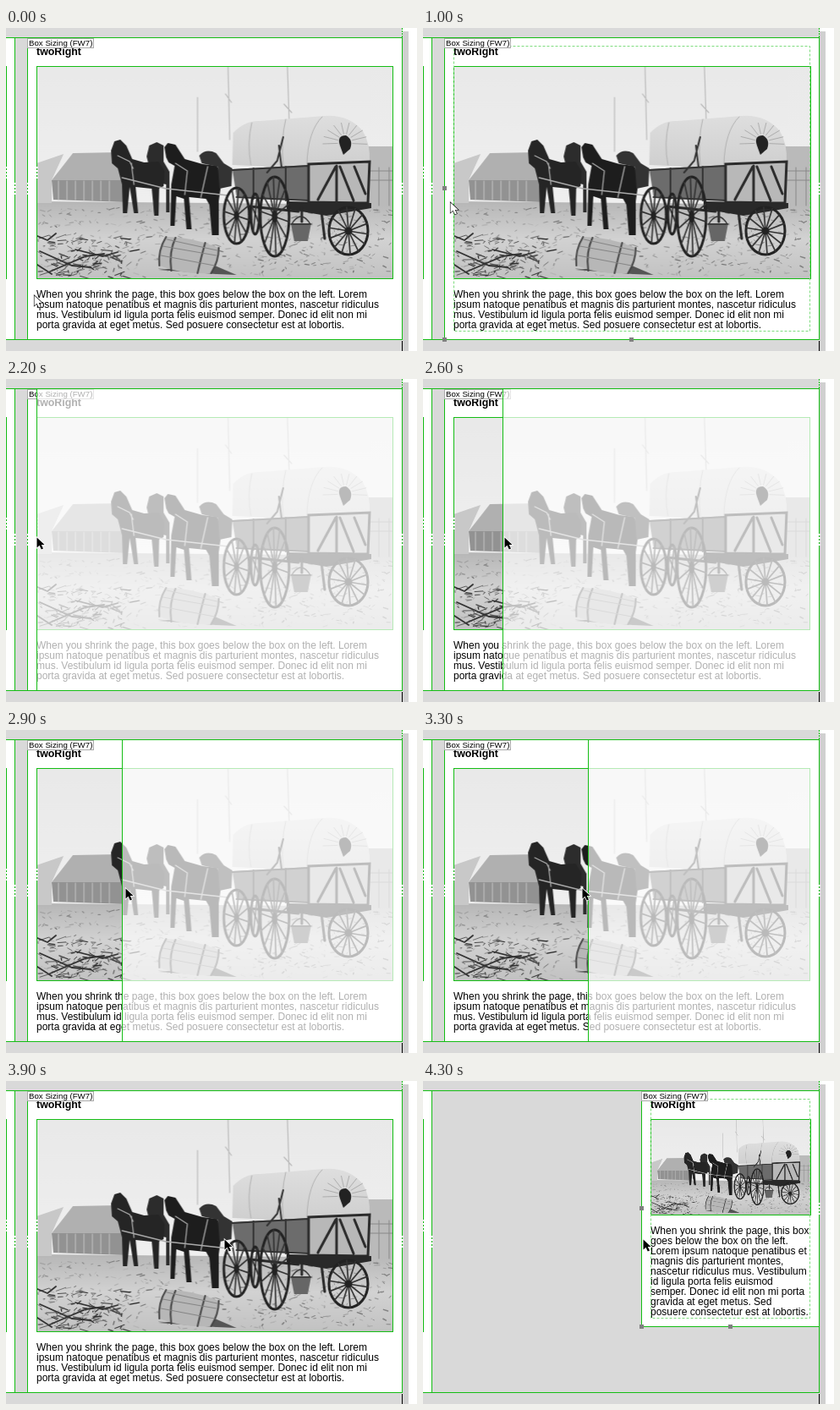
Animation of 486x382 px, one loop 7.3 s. Source, as an HTML page with a canvas:

```html
<!DOCTYPE html>
<html lang="en">
<head>
<meta charset="utf-8">
<title>Box sizing</title>
<style>
  html, body { margin: 0; width: 100%; height: 100%; overflow: hidden; background: #fff; }
  canvas { display: block; }
</style>
</head>
<body>
<canvas id="stage" width="486" height="382"></canvas>
<script>
const ctx = document.getElementById('stage').getContext('2d');
const LOOP = 7300, STEP = 100;
const GREEN = '#14bd14', GREY = '#d9d9d9';
const SANS = '"Liberation Sans", Arial, sans-serif';

// Keyframes: [time, value...]
const cursorKeys = [[0, 33, 316], [800, 32, 206], [1000, 32, 206], [1600, 26, 187], [2000, 26, 187],
  [2200, 36, 187], [2900, 141, 187], [3600, 223, 187], [3900, 258, 187], [4300, 260, 187]];
const edgeKeys = [[2000, 25], [2200, 36], [2900, 137], [3600, 238], [3800, 258]];

const wide = {
  x: 25, bottom: 368, photoBottom: 296, baseline: 319,
  lines: ['When you shrink the page, this box goes below the box on the left. Lorem',
    'ipsum natoque penatibus et magnis dis parturient montes, nascetur ridiculus',
    'mus. Vestibulum id ligula porta felis euismod semper. Donec id elit non mi',
    'porta gravida at eget metus. Sed posuere consectetur est at lobortis.']
};
const narrow = {
  x: 258, bottom: 290, photoBottom: 158, baseline: 181,
  lines: ['When you shrink the page, this box', 'goes below the box on the left.',
    'Lorem ipsum natoque penatibus et', 'magnis dis parturient montes,',
    'nascetur ridiculus mus. Vestibulum', 'id ligula porta felis euismod',
    'semper. Donec id elit non mi porta', 'gravida at eget metus. Sed',
    'posuere consectetur est at lobortis.']
};

function sample(keys, t) {
  let i = 1;
  while (i < keys.length - 1 && t > keys[i][0]) i++;
  const a = keys[i - 1], b = keys[i];
  const k = Math.max(0, Math.min(1, (t - a[0]) / (b[0] - a[0])));
  return a.slice(1).map((v, n) => Math.round(v + (b[n + 1] - v) * k));
}

function rect(color, x, y, w, h) {
  ctx.fillStyle = color;
  ctx.fillRect(x, y, w, h);
}

function frame(color, x, y, right, bottom, dash = []) {
  ctx.strokeStyle = color;
  ctx.lineWidth = 1;
  ctx.setLineDash(dash);
  ctx.strokeRect(x + .5, y + .5, right - x, bottom - y);
  ctx.setLineDash([]);
}

function text(str, x, y, font) {
  ctx.fillStyle = '#000';
  ctx.font = `${font} ${SANS}`;
  ctx.fillText(str, x, y);
}

// Dotted gap in the middle of an edge
function flexMark(x, top, bottom) {
  const mid = Math.floor((top + bottom) / 2);
  for (let y = mid - 6; y < mid + 8; y += 4) rect('#fff', x, y, 2, 2);
}

function makePhoto() {
  const canvas = document.createElement('canvas');
  canvas.width = 421;
  canvas.height = 251;
  const g = canvas.getContext('2d');
  g.translate(-36, -45);
  g.lineCap = 'round';

  let seed = 7;
  const random = () => (seed = seed * 16807 % 2147483647) / 2147483647;
  const fill = (color, d) => { g.fillStyle = color; g.fill(new Path2D(d)); };
  const line = (color, width, d) => {
    g.strokeStyle = color;
    g.lineWidth = width;
    g.stroke(new Path2D(d));
  };
  const gradient = (top, bottom, ...stops) => {
    const grad = g.createLinearGradient(0, top, 0, bottom);
    stops.forEach((c, i) => grad.addColorStop(i / (stops.length - 1), c));
    return grad;
  };
  const scatter = (count, x, y, w, h, size, shade) => {
    for (let i = 0; i < count; i++) {
      const px = x + random() * w, py = y + random() * h, v = shade + random() * 70;
      line(`rgb(${v},${v},${v})`, .5 + random(), `M${px} ${py}l${(random() - .3) * size} ${(random() - .5) * size * .5}`);
    }
  };
  const wheel = (x, y, rx, ry, spokes) => {
    g.strokeStyle = '#222';
    g.lineWidth = 3;
    g.beginPath();
    g.ellipse(x, y, rx, ry, 0, 0, 7);
    g.stroke();
    for (let i = 0; i < spokes; i++) {
      const a = (i + .3) / spokes * Math.PI * 2;
      line('#333', 1.7, `M${x} ${y}L${x + rx * Math.cos(a)} ${y + ry * Math.sin(a)}`);
    }
    g.fillStyle = '#222';
    g.beginPath();
    g.ellipse(x, y, rx * .2, ry * .15, 0, 0, 7);
    g.fill();
  };

  // Sky, masts and ground
  fill(gradient(45, 200, '#e9e9e9', '#efefef'), 'M36 45H457V210H36Z');
  line('#bbb', 1.2, 'M226 82V146M262 46L264 132M332 46L334 108M328 90l9 10M259 78l7 10');
  fill(gradient(203, 296, '#b5b5b5', '#d2d2d2', '#c2c2c2'), 'M36 205L457 209V296H36Z');

  // Tents and sheds
  fill('#c8c8c8', 'M36 160L68 149L54 180V207H36Z');
  fill('#b0b0b0', 'M54 180L79 148L134 147L136 180Z');
  fill('#929292', 'M54 180H142V206L56 203Z');
  line('#c4c4c4', 1, 'M62 181V203M72 181V203M82 181V203M92 181V204M102 181V204M112 181V204M122 181V205');
  fill('#bababa', 'M426 140H457V211H426Z');
  line('#888', 1, 'M430 169H457M430 180H457M440 165V210M452 165V210');
  scatter(520, 38, 212, 416, 82, 9, 115);
  scatter(130, 38, 248, 110, 46, 18, 35);
  line('#333', 1.8, 'M37 246l12 5l10-8M40 264l38 17l22 2M52 288l42-18l22-3M37 280l17 11M82 262l32 8l18-5');

  // Horse team
  fill('#2c2c2c', 'M166 152L169 139L178 135L186 139V158L193 170V218H189V185L181 183L180 222H175L173 180Z');
  fill('#252525', 'M125 160L124 145L128 134L135 132L142 139L149 155L163 159L180 158L187 169L186 187L180 190V222H175L172 190L153 188L156 219H151L146 188L143 219H138L137 185L132 166Z');
  fill('#1d1d1d', 'M189 153L187 141L191 136L200 138L211 155L232 161L249 163L255 177L251 205V245H243L240 209L236 202L216 200L219 238H213L210 202L201 199L199 234H194L195 185L199 163L192 159Z');
  fill('#333', 'M228 151Q236 142 248 148L257 160L267 166L266 187L252 190L250 164L231 160Z');
  line('#aaa', 1.3, 'M132 151l14 7l4 8M148 160l3 25M137 177l52 13M200 160l14 9l-3 28M190 190l72 8M238 164l-8 36');

  // Wagon
  fill(gradient(105, 165, '#dedede', '#cfcfcf'), 'M267 162L268 124Q282 109 300 110L376 104Q404 102 421 122Q430 137 429 158L358 160L352 166Z');
  line('#b2b2b2', 1, 'M290 112Q284 137 289 162M330 108Q324 132 327 162M373 105Q356 122 355 161');
  for (let i = 0; i < 10; i++) {
    const a = 3.1 + i * .36;
    line('#a8a8a8', .9, `M${400 + 9 * Math.cos(a)} ${136 + 11 * Math.sin(a)}L${400 + 26 * Math.cos(a)} ${136 + 24 * Math.sin(a)}`);
  }
  fill('#222', 'M394 139Q390 127 401 127Q410 132 406 143L398 150Z');
  fill('#6c6c6c', 'M267 167L357 162V204L272 199Z');
  line('#333', 2, 'M267 168L357 163V204L272 200M292 166V202M330 164V204M327 129L320 157L308 171M322 139L325 164');
  fill('#b8b8b8', 'M357 161L429 158L427 207L357 206Z');
  line('#2b2b2b', 3, 'M357 161L429 158L427 207L357 206ZM368 203L389 164M390 163V205M394 164L410 204M411 164L424 196');
  fill('#292929', 'M331 205L431 207V213L378 222L331 214Z');
  line('#292929', 3, 'M288 211L345 217M372 216L376 249M349 213V229');
  fill('#666', 'M336 231H360L356 252H340Z');
  line('#333', 1.4, 'M337 232Q348 214 359 232M336 232H360');
  wheel(272, 222, 15, 33, 12);
  wheel(294, 220, 5, 24, 4);
  wheel(317, 223, 17, 47, 14);
  wheel(404, 240, 23, 28, 14);

  // Barrel
  fill('#555', 'M180 286L248 291L272 292L244 280Z');
  fill('#b7b7b7', 'M189 247Q220 247 251 260Q251 276 242 290Q209 292 181 281Q179 263 189 247Z');
  line('#444', 2, 'M189 247Q179 263 181 281M200 248Q192 265 195 287M235 254Q230 272 226 290M251 260Q251 276 242 290');
  line('#858585', 1, 'M185 258L248 269M183 269L246 281M190 250L249 263');
  return canvas;
}

const photo = makePhoto();

function drawPage() {
  rect('#fff', 0, 0, 486, 382);
  rect(GREY, 0, 0, 468, 382);
  rect('#d0d0d0', 469, 4, 7, 378);
  rect('#fff', 0, 12, 10, 356);
  rect(GREEN, 0, 11, 469, 1);
  rect(GREEN, 0, 368, 469, 1);
  rect(GREEN, 468, 11, 1, 358);
  for (let y = 0; y < 11; y += 3) rect(GREEN, 468, y, 1, 2);
  rect('#000', 468, 370, 1, 12);
  rect(GREEN, 10, 11, 1, 358);
  rect(GREEN, 0, 45, 1, 252);
  flexMark(0, 45, 296);
  flexMark(10, 11, 368);
}

function drawBox({ x, bottom, photoBottom, baseline, lines }, selected) {
  const left = x + 11, middle = Math.floor((11 + bottom) / 2);
  rect('#fff', x, 11, 468 - x, bottom - 11);
  frame(GREEN, x, 11, 468, bottom);
  text('twoRight', left, 32, 'bold 12.4px');
  ctx.drawImage(photo, left, 45, 458 - left, photoBottom - 45);
  frame(GREEN, left, 45, selected ? 458 : 457, photoBottom);
  lines.forEach((str, i) => text(str, left, baseline + i * 12, '12px'));
  if (selected) frame('#7edc7e', left, 21, 457, bottom - 10, [3, 2]);
  else {
    flexMark(x, 11, bottom);
    flexMark(left, 45, photoBottom);
  }
  flexMark(468, 11, bottom);
  rect('#fff', x + 1, 12, 78, 11);
  frame('#aaa', x, 12, x + 78, 23);
  text('Box Sizing (FW7)', x + 2, 21, '9.7px');
  if (selected) {
    for (const [hx, hy] of [[x, middle], [x, bottom], [Math.floor((x + 468) / 2), bottom]])
      rect('#808080', hx - 2, hy - 2, 5, 5);
  }
}

function drawDrag(edge) {
  rect('rgba(255,255,255,.69)', edge, 12, 468 - edge, 356);
  rect(GREEN, edge, 11, 1, 358);
}

const arrow = new Path2D('M.5 .5V12.5L3.5 9.8L5.8 14.5L8 13.5L5.8 9H9.5Z');

function drawCursor([x, y], dragging) {
  ctx.save();
  ctx.translate(x, y);
  ctx.lineWidth = dragging ? 1.5 : 1.2;
  ctx.strokeStyle = dragging ? '#fff' : '#000';
  ctx.fillStyle = dragging ? '#000' : '#fff';
  ctx.stroke(arrow);
  ctx.fill(arrow);
  ctx.restore();
}

function draw(now) {
  const t = Math.floor(now % LOOP / STEP) * STEP;
  const resized = t >= 4200;
  drawPage();
  drawBox(resized ? narrow : wide, resized || (t >= 900 && t < 2000));
  if (t >= 2000 && t < 3800) drawDrag(sample(edgeKeys, t)[0]);
  drawCursor(sample(cursorKeys, t), t >= 1800);
  requestAnimationFrame(() => draw(performance.now() - start));
}

const start = performance.now();
draw(0);
</script>
</body>
</html>
```
